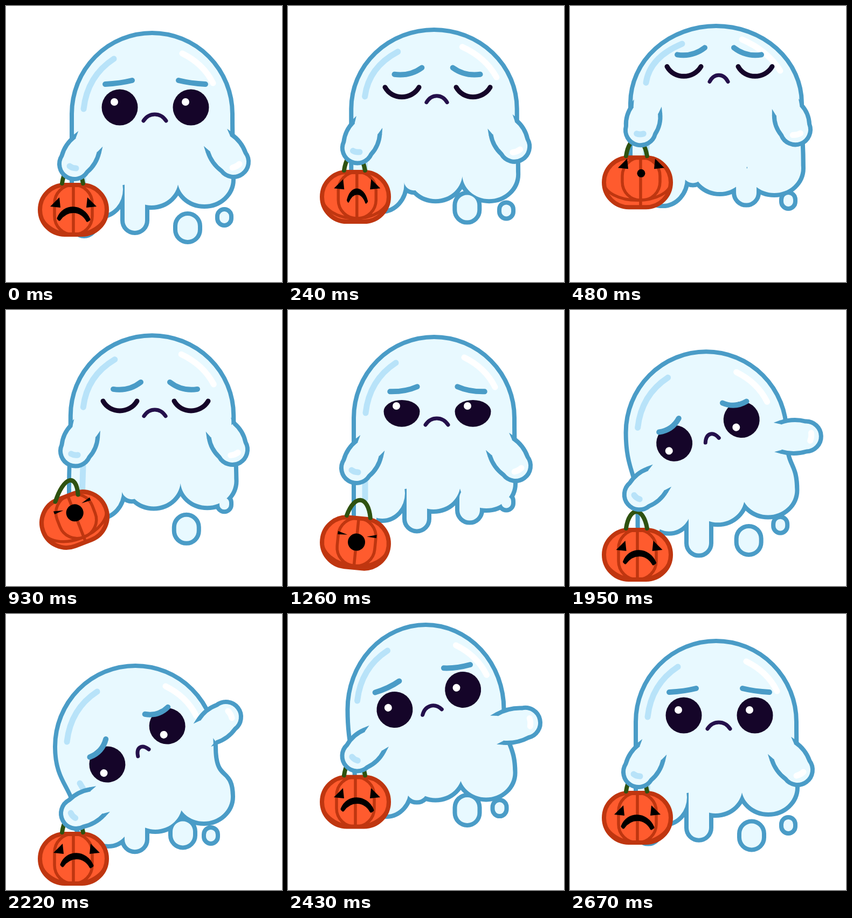
Animation of 512 by 512 pixels, one loop 2.7 s. Source, as an HTML page with a canvas:

```html
<!DOCTYPE html>
<html lang="en">
<head>
<meta charset="utf-8">
<title>Sad ghost</title>
<style>
  html, body { margin: 0; width: 100%; height: 100%; overflow: hidden; background: #fff; }
  canvas { display: block; width: 512px; height: 512px; }
</style>
</head>
<body>
<canvas id="stage" width="512" height="512"></canvas>
<script>
const c = document.getElementById('stage').getContext('2d');
const LOOP = 2700, STEP = 30, TAU = 2 * Math.PI;
const SKIN = '#e8f9ff', LINE = '#4a9cc7', SHINE = '#b8e3f9', INK = '#150529',
      LIP = '#24104b', PEEL = '#ff5b2e', RIB = '#bf3610', STEM = '#2f5210';
let t = 0;

const mix = (a, b, k) => a + (b - a) * k;
const rise = (a, b) => {
  const u = Math.min(1, Math.max(0, (t - a) / (b - a)));
  return u * u * (3 - 2 * u);
};
// Up between a and b, down between d and e
const bump = (a, b, d, e) => rise(a, b) - rise(d, e);
const wave = period => Math.cos(TAU * t / period);

// How far each action has got, 0 to 1
function mood() {
  return {
    puff: bump(0, 500, 540, 1100),
    raise: bump(0, 500, 600, 1260),
    shut: bump(120, 270, 1080, 1380),
    look: bump(1280, 1600, 2220, 2500),
    lean: bump(1680, 2160, 2220, 2640),
    hop: bump(2220, 2430, 2430, 2650)
  };
}

function stroke(color, width, draw, cap = 'round') {
  c.beginPath();
  draw();
  c.strokeStyle = color;
  c.lineWidth = width;
  c.lineCap = cap;
  c.lineJoin = 'round';
  c.stroke();
}
function fill(color, draw) {
  c.beginPath();
  draw();
  c.fillStyle = color;
  c.fill();
}
function bow(x1, y1, cx, cy, x2, y2) {
  c.moveTo(x1, y1);
  c.quadraticCurveTo(cx, cy, x2, y2);
}
function placed(x, y, angle, draw) {
  c.save();
  c.translate(x, y);
  c.rotate(angle);
  draw();
  c.restore();
}
function lobe(x, y, rx, ry) {
  c.moveTo(x + rx, y);
  c.ellipse(x, y, rx, ry, 0, 0, TAU);
}
function capsule(x, y1, y2, r) {
  c.roundRect(x - r, y1 - r, 2 * r, y2 - y1 + 2 * r, r);
}

function ghost({ puff, raise, look, lean, hop }) {
  const cx = 271 - 31 * lean, top = 54 - 13 * puff + 46 * lean - 53 * hop;
  const w = 145 + 10 * puff - 4 * hop, sy = 200 - 20 * puff + 46 * lean - 46 * hop;
  const side = { x: 175 - 3 * raise + 15 * lean, y: 340 - 20 * puff + 40 * lean - 35 * hop };
  const mid = { x: 270 + 8 * raise + 7 * lean, y: 322 - 25 * puff + 16 * look + 14 * lean - 38 * hop };
  const right = { x: 368 + 11 * raise - 1 * lean, y: 322 - 21 * puff + 6 * look + 11 * lean - 34 * hop };
  const leftX = 145 - 10 * raise + 6 * lean, leftY = 393 + 11 * wave(675) - 45 * raise - 20 * hop;
  const dripX = 239 - 11 * raise, dripY = mid.y + 44 + 32 * wave(675) - 24 * puff + 30 * lean;
  const dropX = 337 - 10 * puff - 9 * lean, dropY = right.y + 69 + 24 * wave(900) + 26 * lean;
  const tail = 7 + 20 * Math.max(0, -wave(900)) * (1 - lean);
  const beadX = 405 - 25 * lean, beadY = right.y + 52 + 18 * wave(2700) + 20 * look - 8 * lean;
  const hipL = leftX - 19, hipR = right.x + 50;

  const parts = () => {
    c.moveTo(cx - w, sy);
    c.ellipse(cx, sy, w, sy - top, 0, Math.PI, TAU);
    c.bezierCurveTo(cx + w, sy + 70, hipR, right.y - 55, hipR, right.y);
    c.lineTo(mid.x, mid.y);
    c.lineTo(side.x, side.y);
    c.lineTo(hipL, side.y);
    c.bezierCurveTo(hipL, side.y - 60, cx - w, sy + 70, cx - w, sy);
    c.closePath();
    lobe(side.x, side.y, 42, 47);
    lobe(mid.x, mid.y, 50, 48);
    lobe(right.x, right.y, 50, 46);
    capsule(leftX, side.y, Math.max(side.y, leftY), 19);
    capsule(dripX, mid.y - 20, dripY, 19);
    capsule(dropX, dropY - tail, dropY, 19);
    capsule(beadX, beadY - 2, beadY + 2, 9);
  };
  // The outline surrounds the union of all parts
  stroke(LINE, 16, parts);
  fill(SKIN, parts);

  placed(-31 * lean, 46 * lean - 53 * hop, 0, () => {
    stroke(SHINE, 11, () => bow(144 - 3 * puff, 191 - 49 * puff, 151 - 3 * puff, 130 - 35 * puff,
                                200 + 8 * puff, 98 - 28 * puff));
    stroke('#fff', 11, () => bow(327 - 8 * puff, 88 - 26 * puff, 366, 107 - 25 * puff,
                                 384 + 6 * puff, 143 - 23 * puff));
  });
  stroke(SHINE, 11, () => {
    c.moveTo(143 - 6 * lean, 300 - 48 * puff + 14 * lean - 20 * hop);
    c.lineTo(143 - 3 * raise, 350 - 70 * puff - 26 * lean - 20 * hop);
  });
}

function face({ puff, shut, look, lean, hop }) {
  const open = 1 - shut, mw = 21 - 4 * puff - 6 * look - 3 * lean;
  const mx = -1 + 3 * look, my = 25 - 7 * look;

  placed(277 - 3 * look - 30.5 * lean, 188 - 73 * puff + 11 * look + 44.5 * lean - 53 * hop, -.569 * lean, () => {
    for (const s of [-1, 1]) {
      c.save();
      c.translate(66 * s, 0);
      if (open < .12) {
        stroke(INK, 9, () => {
          c.moveTo(-31, -3);
          c.bezierCurveTo(-18, 21, 18, 21, 32, -3);
        });
      } else {
        fill(INK, () => {
          c.ellipse(0, 0, 33.5, mix(20, 33.5, open), 0, 0, Math.PI);
          c.ellipse(0, 0, 33.5, Math.max(0, mix(-2, 33.5, open)), 0, Math.PI, TAU);
        });
        if (open > .45) fill('#fff', () => c.arc(-10 - 4 * look, -10 + 20 * look, 7, 0, TAU));
      }
      c.scale(-s, 1);
      const ox = -27 + 15 * shut + 7 * look, oy = -43 + 18 * shut + 14 * look;
      const ix = 23 + 16 * shut, iy = -50 + 12 * shut + 9 * look;
      stroke(LINE, 10, () => bow(ox, oy, (ox + ix) / 2 + 3, (oy + iy) / 2 + 2 + 9 * (shut + look), ix, iy));
      c.restore();
    }
    stroke(LIP, 7, () => {
      c.moveTo(mx - mw, my);
      c.bezierCurveTo(mx - mw * .5, my - 16, mx + mw * .5, my - 16, mx + mw, my);
    });
  });
}

// Sleeve edges run from either side of the shoulder s to the round hand h
function arm(s, h, side, color, mark, rest) {
  const R = 28, a = Math.atan2(h.y - s.y, h.x - s.x);
  const ux = Math.cos(a), uy = Math.sin(a);
  const edge = k => {
    const nx = -uy * k, ny = ux * k;
    const from = [s.x + 27 * nx, s.y + 27 * ny], to = [h.x + R * nx, h.y + R * ny];
    const bend = [mix(from[0], to[0], .5) + 7 * nx, mix(from[1], to[1], .5) + 7 * ny];
    return { from, to, bend, k };
  };
  const outer = edge(side), inner = edge(-side), q = side * Math.PI / 2;
  const path = () => {
    c.moveTo(...outer.from);
    c.quadraticCurveTo(...outer.bend, ...outer.to);
    c.arc(h.x, h.y, R, a + q, a - q, side > 0);
    c.quadraticCurveTo(...inner.bend, ...inner.from);
  };
  fill(SKIN, path);
  stroke(LINE, 8, path, 'butt');
  for (const { from: [x, y], bend, k } of [outer, inner]) {
    placed(x, y, Math.atan2(y - bend[1], x - bend[0]), () => fill(LINE, () => {
      c.moveTo(-1, -4);
      c.lineTo(-1, 4);
      c.lineTo(12, -4 * k);
    }));
  }
  placed(h.x, h.y, a - rest, () => stroke(color, 11, () => bow(...mark)));
}

const leftHand = ({ raise, look, lean, hop }) => ({
  x: 127 + 4 * raise + 3 * lean,
  y: 293 - 63 * raise + 9 * look + 68 * lean - 65 * hop
});

function arms(m) {
  const { raise, look, lean, hop } = m;
  const swing = 100 * lean * (1 - lean);
  arm({ x: 150 - 9 * raise + 19 * lean, y: 257 - 65 * raise + 9 * look + 83 * lean - 65 * hop },
      leftHand(m), 1, SHINE, [-9, 4, -4, 8, 3, 8], 2.14);
  arm({ x: 396 + 8 * raise - 22 * lean + swing / 3, y: 254 - 61 * raise + 9 * look - 46 * lean - 20 * hop },
      { x: 422 - 4 * raise - 14 * lean + swing, y: 289 - 60 * raise + 9 * look - 107 * lean - 35 * hop },
      -1, '#fff', [-2, 11, 6, 9, 11, 4], .93);
}

// Held by the hand, dropped, bounced once, then picked up again
function pumpkinY(m) {
  const FALL = 570, HIT = 1085, REST = 1435, FLOOR = 454;
  if (t >= FALL && t < HIT) return mix(327, FLOOR, ((t - FALL) / (HIT - FALL)) ** 2);
  if (t >= HIT && t < REST) {
    const u = (t - HIT) / (REST - HIT);
    return FLOOR - 88 * u * (1 - u);
  }
  return t >= REST && t <= 2220 ? FLOOR : leftHand(m).y + 85 + 12 * m.raise;
}

function pumpkin(m) {
  const squash = Math.exp(-(((t - 1092) / 42) ** 2));
  const flop = bump(570, 930, 930, 1090), rock = bump(1085, 1260, 1260, 1435);
  const roll = bump(0, 500, 600, 1600), squint = bump(570, 850, 1290, 1440);
  const talk = bump(120, 300, 1400, 1560);
  const sx = 1 + .2 * squash, sy = 1 - .16 * squash;

  c.save();
  c.translate(125 + 2 * flop, pumpkinY(m) + 50 * (1 - sy));
  c.scale(sx, sy);
  c.rotate(-.37 * flop + .1 * rock);
  const shell = () => c.roundRect(-62, -46, 124, 92, 46);
  const depth = 46 - 13 * roll;
  fill(PEEL, shell);
  stroke(RIB, 5.5, () => {
    c.roundRect(-35 + 7 * roll, -46, 70, 46 + depth, 34);
    c.moveTo(6 * roll, -46);
    c.lineTo(6 * roll, 46);
    c.moveTo(62, 0);
    c.ellipse(0, 0, 62, depth, 0, 0, Math.PI);
  });
  stroke(RIB, 8, shell);
  stroke(STEM, 8, () => {
    const tip = 24 * flop + 4 * rock, peak = -90 + 9 * flop;
    c.moveTo(-21, -49 + 5 * flop);
    c.bezierCurveTo(-15 + tip, peak, 11 + tip, peak, 18 + 5 * (flop + rock), -49 + 8 * flop);
  });

  c.translate(7 * roll + 6 * m.lean, -21 * roll - 5 * m.lean);
  for (const s of [1, -1]) fill('#000', () => {
    c.moveTo(s * mix(-43, -36, squint), mix(-6, -7, squint));
    c.lineTo(s * mix(-26, -36, squint), mix(-23, -13, squint));
    c.lineTo(s * mix(-24, -18, squint), mix(-4, -8, squint));
  });
  if (talk > .95) {
    fill('#000', () => c.arc(0, 4, 7.5 + 8.5 * squint, 0, TAU));
  } else {
    c.scale(1 - .5 * talk, 1);
    const frown = () => {
      c.moveTo(-28, 16);
      c.bezierCurveTo(-18, -10, 17, -10, 29, 18);
      c.lineTo(26, 20);
      c.bezierCurveTo(13, -2, -12, -1, -26, 18);
      c.closePath();
    };
    fill('#000', frown);
    stroke('#000', 5, frown);
  }
  c.restore();
}

let start;
function draw(now) {
  start ??= now;
  t = Math.floor(((now - start) % LOOP) / STEP) * STEP;
  const m = mood();
  c.fillStyle = '#fff';
  c.fillRect(0, 0, 512, 512);
  ghost(m);
  face(m);
  pumpkin(m);
  arms(m);
  requestAnimationFrame(draw);
}
requestAnimationFrame(draw);
</script>
</body>
</html>
```
